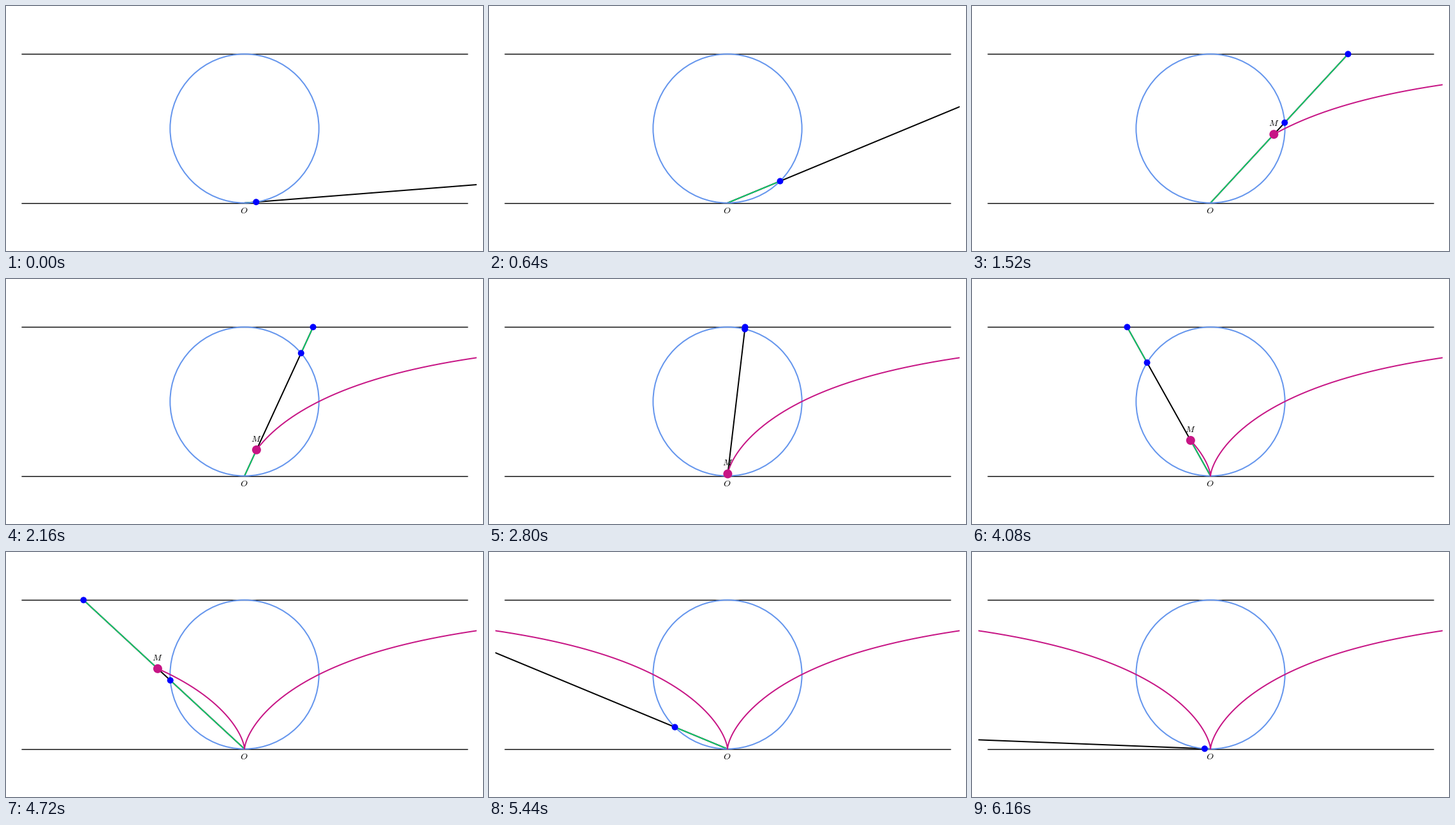
Animation of 748x384 px, one loop 6240 ms. Source, as a matplotlib script:

```python
import numpy as np
import matplotlib.pyplot as plt
from matplotlib.animation import FuncAnimation
from matplotlib.patches import Circle

W, H, DPI, PAD = 748, 384, 100, 10
PX = 72 / DPI
FRAMES, INTERVAL = 78, 80
CX, CY, R = W / 2, H / 2, 350 / 3
D = 2 * R
START, STEP = 4.5, 2.25

plt.rcParams["mathtext.fontset"] = "cm"
plt.rcParams["lines.solid_capstyle"] = "butt"

fig = plt.figure(figsize=(W / DPI, H / DPI), dpi=DPI, facecolor="white")
ax = fig.add_axes([PAD / W, PAD / H, 1 - 2 * PAD / W, 1 - 2 * PAD / H])
ax.set_xlim(PAD, W - PAD)
ax.set_ylim(H - PAD, PAD)
ax.axis("off")


def line(color, width, z, xs=(), ys=()):
    return ax.plot(xs, ys, color=color, lw=width * PX, zorder=z)[0]


def disc(color, radius, z):
    return ax.add_patch(Circle((0, 0), radius, fc=color, ec="none", zorder=z))


def label(text, x=0, y=0):
    return ax.text(x, y, text, fontsize=14 * PX, ha="center", va="center",
                   clip_on=True, zorder=9)


def polar(r, t):
    """Stage position at distance r from O in direction t."""
    return CX + r * np.cos(t), CY + R - r * np.sin(t)


def cissoid(t):
    return D * np.cos(t) ** 2 / np.sin(t)


def set_segment(artist, t, r0, r1):
    artist.set_data(*polar(np.array([r0, r1]), t))


ends = (CX - 3 * R, CX + 3 * R)
line("black", 1.4, 1, ends, (CY + R,) * 2)
line("black", 1.4, 1, ends, (CY - R,) * 2)
ax.add_patch(Circle((CX, CY), R, fc="none", ec="cornflowerblue",
                    lw=2 * PX, zorder=4))
label("$O$", CX - 0.5, CY + R + 12)

ray = line("black", 2, 2)
inner = line("springgreen", 1.3, 3)
outer = line("springgreen", 1.3, 3)
trace = line("mediumvioletred", 2, 6)
on_circle = disc("blue", 5, 7)
on_tangent = disc("blue", 5, 7)
m_dot = disc("mediumvioletred", 7, 8)
m_label = label("$M$")


def update(i):
    t = np.radians(START + STEP * i)
    chord, far, m = D * np.sin(t), D / np.sin(t), cissoid(t)

    set_segment(ray, t, 0, far)
    set_segment(inner, t, 0, min(chord, m))
    set_segment(outer, t, max(chord, m), far)

    past = np.linspace(np.radians(START), t, 8 * i + 2)
    trace.set_data(*polar(cissoid(past), past))

    on_circle.center = polar(chord, t)
    on_tangent.center = polar(far, t)
    mx, my = polar(m, t)
    m_dot.center = mx, my
    m_label.set_position((mx - 0.2, my - 17))
    m_label.set_visible(PAD < mx < W - PAD)
    return ray, inner, outer, trace, on_circle, on_tangent, m_dot, m_label


anim = FuncAnimation(fig, update, frames=FRAMES, interval=INTERVAL,
                     repeat=True, repeat_delay=0, blit=False)
plt.show()
```
